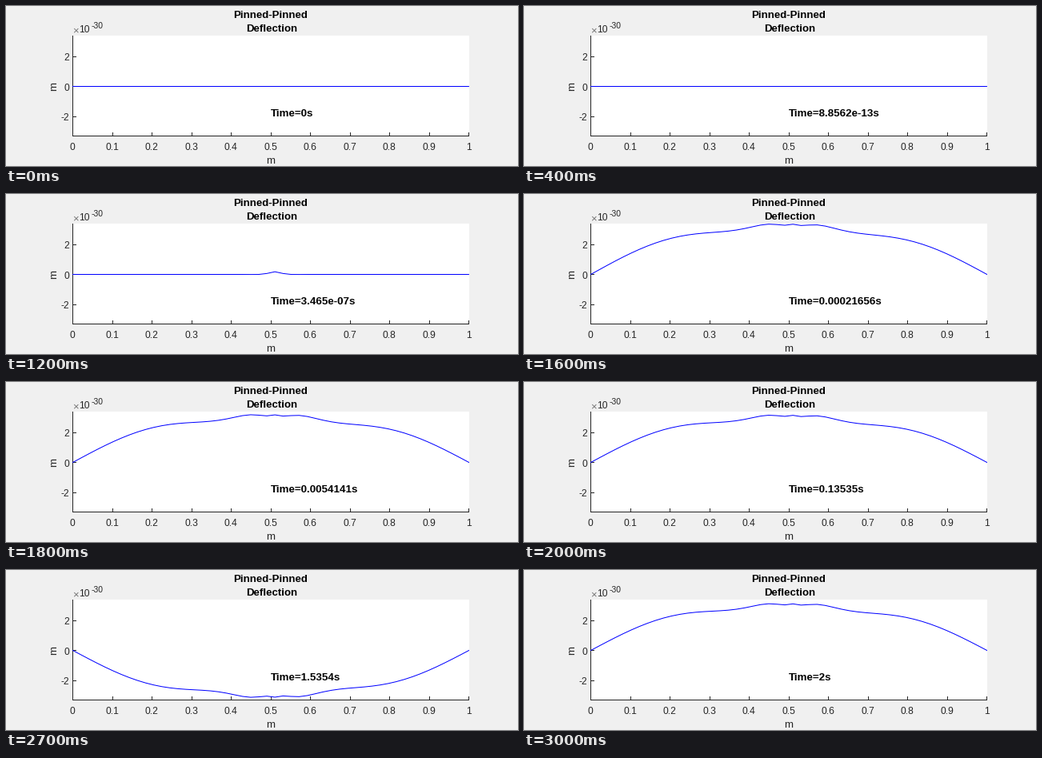
These frames come from a looping animation (640x200 px, 3.1 s). A matplotlib script:

```python
import numpy as np
import matplotlib
import matplotlib.pyplot as plt
from matplotlib.animation import FuncAnimation
from matplotlib.patches import Rectangle

matplotlib.rcParams["font.family"] = "Liberation Sans"

WIDTH, HEIGHT, DPI = 640, 200, 100
PT = 72 / DPI                      # points per pixel
LEFT, RIGHT, TOP, BOTTOM = 83.5, 578.7, 37.5, 162.5
ZERO, UNIT, PEAK = 100.5, 18.75, 3.35
INK = (0.15, 0.15, 0.15)

# Implicit solver steps: five times longer each, then capped at 0.2 s
FIRST_STEP, END, FRAMES = 5.67707e-15, 2.0, 31
steps = [FIRST_STEP * 5**k for k in range(20)] + [0.2] * 9
steps.append(END - sum(steps))
times = np.concatenate([[0], np.cumsum(steps)])


def beam_history(nodes=50, struck=25, omega1=9466.0):
    """Pinned beam struck at one node, stepped by the trapezoidal rule."""
    spans = nodes - 1
    n = np.arange(1, spans)
    x = np.linspace(0, 1, nodes)
    omega = omega1 * (np.sin(n * np.pi / (2 * spans)) / np.sin(np.pi / (2 * spans)))**2
    turns = 2 * np.arctan(np.outer(steps, omega) / 2)
    phase = np.vstack([np.zeros(len(n)), np.cumsum(turns, axis=0)])
    weight = np.sin(n * np.pi * x[struck]) / omega
    y = (weight * np.sin(phase)) @ np.sin(np.pi * np.outer(n, x))
    return x, y * PEAK / np.abs(y).max()


def to_x(v):
    return LEFT + v * (RIGHT - LEFT)


def to_y(v):
    return ZERO - v * UNIT


def pixel(v):
    """Centre of the pixel that holds v."""
    return np.floor(v) + 0.5


fig = plt.figure(figsize=(WIDTH / DPI, HEIGHT / DPI), dpi=DPI, facecolor="#f0f0f0")
ax = fig.add_axes([0, 0, 1, 1])
ax.set_xlim(0, WIDTH)
ax.set_ylim(HEIGHT, 0)
ax.axis("off")


def label(x, y, text, size=12, ha="center", color=INK, **kw):
    return ax.text(x, y, text, fontsize=size * PT, ha=ha, va="baseline",
                   color=color, **kw)


def stroke(xs, ys, color=INK, **kw):
    return ax.plot(xs, ys, color=color, lw=PT, snap=False, **kw)[0]


panel = Rectangle((83, 37), 496, 126, fc="white", ec="none", zorder=0)
ax.add_patch(panel)

# Axes lines, ticks and tick labels
stroke([LEFT, LEFT], [TOP, BOTTOM])
stroke([LEFT, pixel(RIGHT)], [BOTTOM, BOTTOM])
for i in range(11):
    px = pixel(to_x(i / 10))
    stroke([px, px], [BOTTOM, BOTTOM - 4])
    label(to_x(i / 10) - 0.5, 180, f"{i / 10:g}")
for v in (-2, 0, 2):
    py = pixel(to_y(v))
    stroke([LEFT, LEFT + 4], [py, py])
    label(79.3, to_y(v) + 5, f"{v}", ha="right")

# Scale factor, axis labels and title
label(83.5, 34, "×", 13, ha="left", color="0.45")
label(91.6, 33.4, "10", ha="left")
label(106.5, 27.6, "-30", 10.4, ha="left")
label(330.4, 197, "m", 13.2)
ax.text(66, 100, "m", fontsize=13.2 * PT, color=INK, rotation=90,
        ha="right", va="center")
label(330.3, 14.8, "Pinned-Pinned", 13.2, color="black", weight="bold")
label(332.2, 32.5, "Deflection", 13.2, color="black", weight="bold")

xs, history = beam_history()
beam = stroke(to_x(xs), to_y(history[0]), color="blue", zorder=3)
beam.set_clip_path(panel)
clock = label(331, 138, "", 13.4, ha="left", color="black", weight="bold")


def draw(i):
    beam.set_ydata(to_y(history[i]))
    clock.set_text(f"Time={times[i]:.5g}s")
    return beam, clock


anim = FuncAnimation(fig, draw, frames=FRAMES, interval=100, repeat=True, repeat_delay=0)
plt.show()
```
